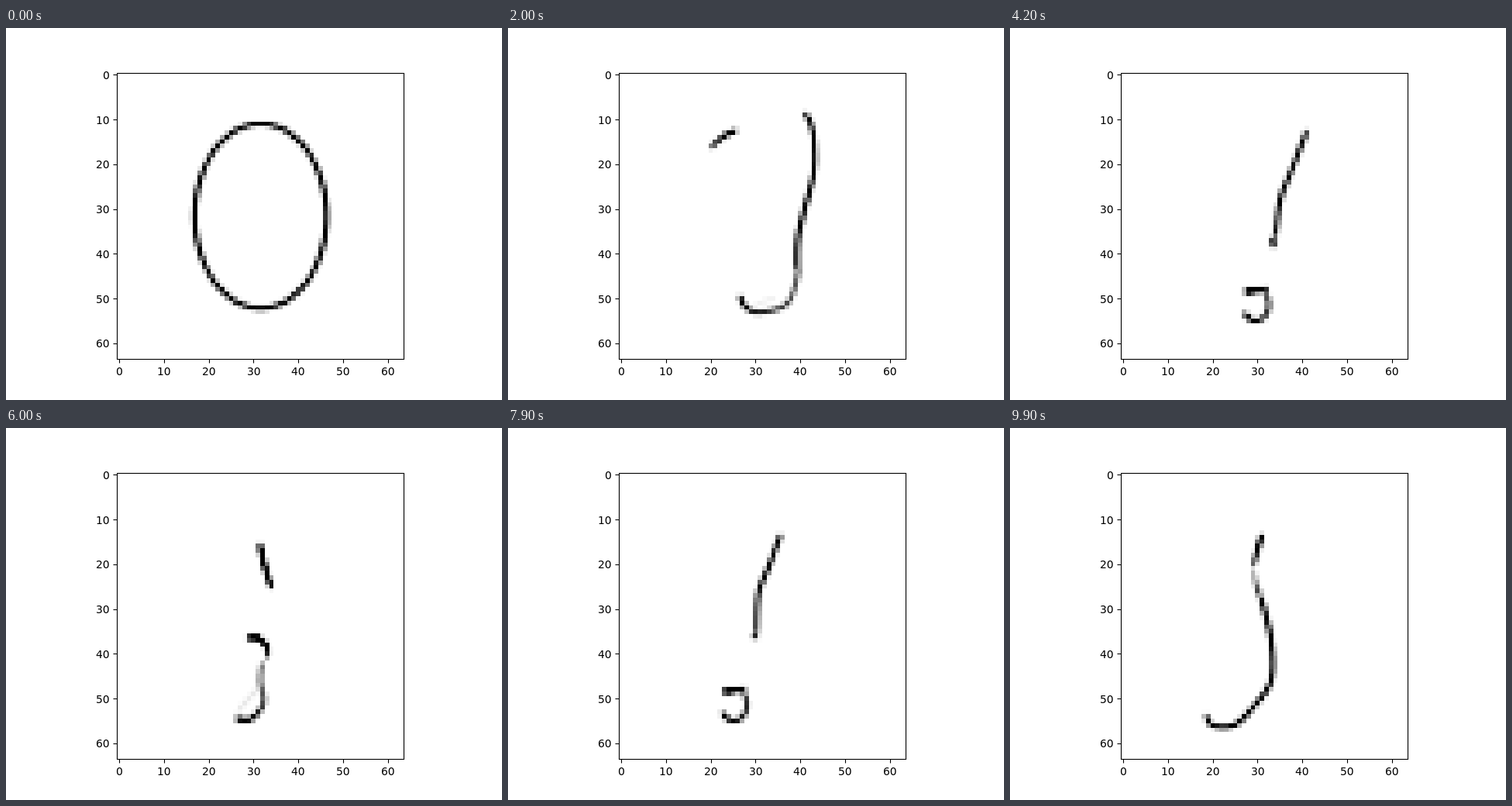
An HTML page with a canvas that plays this animation: 640 px wide and 480 px high, repeating every 10000 ms.

```html
<!DOCTYPE html>
<html lang="en">
<head>
<meta charset="utf-8">
<title>Morphing stroke</title>
<style>
html, body { margin: 0; width: 100%; height: 100%; overflow: hidden; background: #fff; }
canvas { display: block; width: 640px; height: 480px; }
</style>
</head>
<body>
<canvas id="stage" width="640" height="480"></canvas>
<script>
const ctx = document.getElementById('stage').getContext('2d');
const GRID = 64, SIZE = 370, LEFT = 143, TOP = 57;
const SAMPLES = 200, STEP = 100, STEPS = 100, GAIN = 1.15;

const mix = (a, b, u) => a + (b - a) * u;

// A stroke is a row of points in grid cells, with its weight at both ends.
function stroke(from, to, at) {
  return { from, to, pts: Array.from({ length: SAMPLES + 1 }, (_, i) => at(i / SAMPLES)) };
}

function spline(a, b, c, d, u) {
  return b + u / 2 * (c - a + u * (2 * a - 5 * b + 4 * c - d + u * (3 * (b - c) + d - a)));
}

// Smooth curve through a few key points.
function curve(text, from = 1, to = from) {
  const keys = text.split(' ').map(p => p.split(',').map(Number));
  const last = keys.length - 1;
  const key = i => keys[Math.max(0, Math.min(last, i))];
  return stroke(from, to, u => {
    const k = Math.min(last - 1, Math.floor(u * last));
    return [0, 1].map(n => spline(key(k - 1)[n], key(k)[n], key(k + 1)[n], key(k + 2)[n], u * last - k));
  });
}

// Part of an ellipse, angles in degrees.
function arc(cx, cy, rx, ry, a0, a1, from = 1, to = from) {
  return stroke(from, to, u => {
    const a = mix(a0, a1, u) * Math.PI / 180;
    return [cx + rx * Math.cos(a), cy + ry * Math.sin(a)];
  });
}

const oval = (a0, a1, w) => arc(31.6, 31.6, 14.7, 20.6, a0, a1, w);
const hook = x => arc(x, 51.4, 2.9, 3.6, -50, 150, 0.75, 1.1);
const cap = x => curve(`${x - 2.3},48.5 ${x + 2.4},47.9`, 2, 1.3);

// Strokes in order: head, stem, tail, bar.
const poses = [
  { at: 0, strokes: [oval(180, 270), oval(270, 390), oval(30, 180), oval(80, 105, 0)] },
  { at: 11, strokes: [
    curve('19.5,18 23,14 27,9.7 32,7'),
    curve('32,7 37,7.2 42.2,10.8 46,16 44.4,26 43,33 43,40'),
    curve('43,40 40,48 35.5,52 27,52 23.2,49 22.3,44.8'),
    curve('34,52 27,52', 0)] },
  { at: 29, strokes: [
    curve('20.6,14.6 19.6,16.9 19.2,18.2', 0.7, 1.8),
    curve('49.9,10.5 46,17.4 40,27.8 36.3,38.5 35.6,46.8'),
    curve('36.4,47 36.9,51 33.7,54.7 30.8,54.4', 0.25, 1.3),
    curve('35,47.5 32,49.8 31,53', 0.1)] },
  { at: 42, ease: 0.5, strokes: [
    curve('33.4,36.5 33.6,38.4', 1.4),
    curve('41,12.7 38,20.5 35.2,27.6 34,36', 0.95),
    hook(29.6), cap(29.6)] },
  { at: 60, strokes: [
    curve('28.8,36.5 31,36.5 32.9,38.5 33,41', 1.9, 0.4),
    curve('31.4,15.7 32.6,21 34,25.2', 1.3),
    curve('32,42 31.5,46 32.2,51 29.5,54.6 26.2,54.5', 0.5, 1.4),
    curve('31,48 28,51 26.5,53', 0.08)] },
  { at: 79, strokes: [
    curve('29.5,36.1 30.3,36.2', 1.3),
    curve('35.6,13.6 33,20.5 30.7,26.5 30.2,35.4', 1, 0.8),
    hook(25.2), cap(25.2)] },
  { at: 99, strokes: [
    curve('29,21.5 29.6,24 30.5,27', 0.3, 1),
    curve('31,13.6 30,17 29,20.5', 1.2, 0.6),
    curve('30.8,27.5 33,37 33,46 29,52 24.8,55.9 20,56 18.5,53.8'),
    curve('33,42 33,46', 0)] }
];

const ink = new Float32Array(GRID * GRID);

// Share a bit of ink among the four nearest cells.
function splat(x, y, m) {
  const c = Math.floor(x), r = Math.floor(y), fx = x - c, fy = y - r, i = r * GRID + c;
  ink[i] += m * (1 - fx) * (1 - fy);
  ink[i + 1] += m * fx * (1 - fy);
  ink[i + GRID] += m * (1 - fx) * fy;
  ink[i + GRID + 1] += m * fx * fy;
}

function inkStroke(a, b, u) {
  const at = i => [0, 1].map(n => mix(a.pts[i][n], b.pts[i][n], u));
  const from = mix(a.from, b.from, u), to = mix(a.to, b.to, u);
  let [px, py] = at(0);
  for (let i = 1; i <= SAMPLES; i++) {
    const [x, y] = at(i);
    const weight = mix(from, to, (i / SAMPLES) ** 2);
    splat((x + px) / 2, (y + py) / 2, Math.hypot(x - px, y - py) * weight * GAIN);
    px = x;
    py = y;
  }
}

const edge = (start, i) => Math.ceil(start + i * SIZE / GRID - 0.5);

function drawCells() {
  for (let r = 0; r < GRID; r++) {
    for (let c = 0; c < GRID; c++) {
      const v = Math.min(1, ink[r * GRID + c]);
      if (v < 0.01) continue;
      const g = Math.round(255 * (1 - v));
      const x = edge(LEFT, c), y = edge(TOP, r);
      ctx.fillStyle = `rgb(${g},${g},${g})`;
      ctx.fillRect(x, y, edge(LEFT, c + 1) - x, edge(TOP, r + 1) - y);
    }
  }
}

const LINE = 1.11;
const hLine = (x0, x1, y) => ctx.fillRect(x0, y - LINE / 2, x1 - x0, LINE);
const vLine = (x, y0, y1) => ctx.fillRect(x - LINE / 2, y0, LINE, y1 - y0);
const snap = v => Math.floor(v + 0.5) + 0.5;

function drawAxes() {
  ctx.fillStyle = '#000';
  hLine(143, 514, 58.5);
  hLine(143, 514, 427.5);
  vLine(143.5, 58, 428);
  vLine(513.5, 58, 428);
  ctx.font = '13.89px "DejaVu Sans", sans-serif';
  for (let n = 0; n <= 60; n += 10) {
    const shift = (n + 0.5) * 5.775, x = 143.2 + shift, y = 57.6 + shift;
    const width = ctx.measureText(n).width;
    vLine(snap(x), 427.5, 432.5);
    hLine(138.5, 143.5, snap(y));
    ctx.fillText(n, Math.round(x - width / 2), 448);
    ctx.fillText(n, Math.round(133.5 - width), Math.round(y + 5.3));
  }
}

function draw(step) {
  let k = 1;
  while (poses[k].at < step) k++;
  const a = poses[k - 1], b = poses[k];
  const u = Math.pow((step - a.at) / (b.at - a.at), b.ease || 1);
  ink.fill(0);
  a.strokes.forEach((s, i) => inkStroke(s, b.strokes[i], u));
  ctx.fillStyle = '#fff';
  ctx.fillRect(0, 0, 640, 480);
  drawCells();
  drawAxes();
}

const begin = performance.now();
let shown = -1;
function tick() {
  const step = Math.floor(Math.max(0, performance.now() - begin) / STEP) % STEPS;
  if (step !== shown) draw(shown = step);
  requestAnimationFrame(tick);
}
tick();
</script>
</body>
</html>
```
